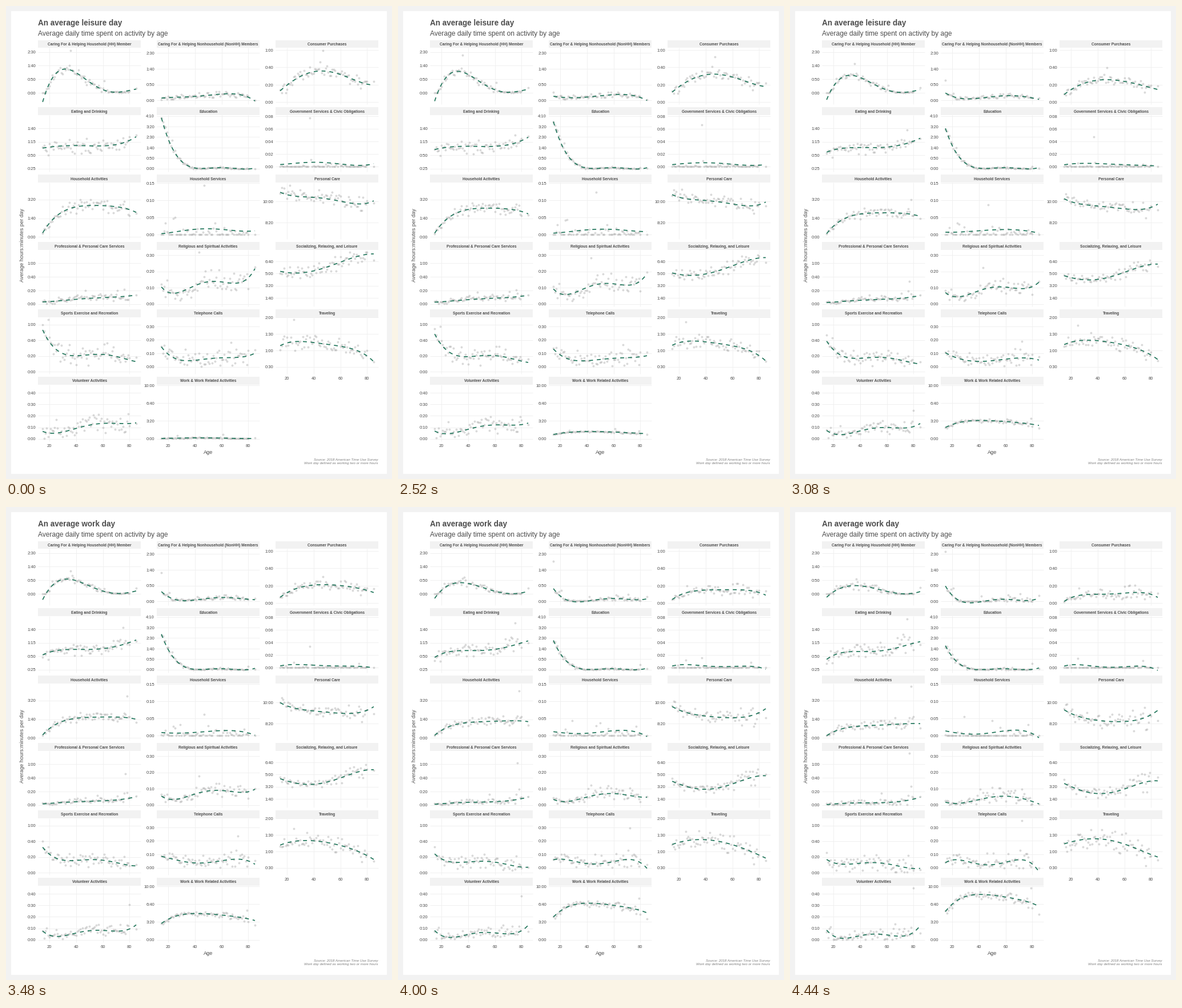
These frames come from a looping animation (676 by 828 pixels, 6720 ms). A matplotlib script:

```python
import numpy as np
import matplotlib.pyplot as plt
from matplotlib.animation import FuncAnimation
from matplotlib.collections import LineCollection
from matplotlib.patches import Rectangle

W, H = 676, 828
FRAMES, STEP_MS = 168, 40
HOLD, MOVE = 55, 56          # last still frame, length of the transition
INK, PALE, GREEN = "#4d4d4d", "#f2f2f2", "#20755a"

LEFT, COLUMN, PANEL_W = 56, 208, 180.2
TOP, ROW, STRIP_H, PANEL_H = 59.6, 117.85, 13.8, 99

plt.rcParams["font.family"] = "Liberation Sans"
fig = plt.figure(figsize=(W / 72, H / 72), dpi=72, facecolor=PALE)
ax = fig.add_axes([0, 0, 1, 1])
ax.set_xlim(0, W)
ax.set_ylim(H, 0)
ax.axis("off")
ax.add_patch(Rectangle((9, 9), W - 18, H - 18, fc="white", lw=0))

ages = np.append(np.arange(15, 81), 85)
knots = (15, 25, 50, 75, 85)
fine = np.linspace(15, 85, 90)

grid, dot_runs, lines = [], [], []


def label(x, y, s, size, ha="left", color=INK, **kw):
    return ax.text(x, y, s, fontsize=size, ha=ha, va="baseline", color=color, **kw)


def scatter(curve, zero, noise, growth, rest, rng):
    """Dots around a curve: spread follows the root of the value, few leap up."""
    n = len(ages)
    mid = curve(ages)
    older = np.clip((ages - 50) / 35, 0, 1)
    sd = noise * np.sqrt(np.maximum(mid - zero, 0.5)) * (1 + growth * older)
    off = sd * np.clip(rng.standard_normal(n), -2, 2)
    leap = (rng.random(n) < 0.05) * 15 * noise * rng.random(n)
    if rest:                 # most dots lie on the zero line
        mid, off = zero, np.abs(off) * (rng.random(n) < 0.35)
    return mid + off + leap


def panel(name, step, rise, dy, leisure, work, noise, peak, start=0, rest=False):
    """Heights are pixels above the first tick, which sits `rise` above the bottom."""
    i = len(lines)
    row, col = divmod(i, 3)
    left, top = LEFT + COLUMN * col, TOP + ROW * row
    right, y_top, y_low = left + PANEL_W, top + STRIP_H, top + STRIP_H + PANEL_H
    base = y_low - rise

    def age_x(age):
        return left + 8.2 + (age - 15) * 2.34

    ax.add_patch(Rectangle((left, top), PANEL_W, STRIP_H, fc=PALE, lw=0))
    label(left + PANEL_W / 2, top + 9.5, name, 6.6, "center", weight="bold")
    for n in range(int((base - y_top) / dy) + 1):
        y, minutes = base - n * dy, (start + n) * step
        grid.append([(left, y), (right, y)])
        label(left - 4, y + 2.7, f"{minutes // 60}:{minutes % 60:02d}", 7.6, "right")
    for age in range(20, 81, 20):
        x = age_x(age)
        grid.append([(x, y_top), (x, y_low)])
        if i >= 14:
            label(x, y_low + 10.5, str(age), 7.6, "center")

    rng = np.random.default_rng(40 + i)
    zero = -dy * start
    curves = [np.polynomial.Polynomial.fit(knots, k, 4) for k in (leisure, work)]
    clouds = [scatter(c, zero, noise, growth, rest, rng)
              for growth, c in enumerate(curves)]
    which, age = peak        # the highest dot sets the panel's scale
    clouds[which][ages == age] = PANEL_H
    clouds = [base - np.clip(c, max(zero, 4.5 - rise), PANEL_H - 4.5 - rise)
              for c in clouds]
    dot_runs.append((age_x(ages), *clouds))

    line, = ax.plot([], [], color=GREEN, lw=1.71, zorder=3)
    line.set_dashes((4, 4))
    line.set_dash_capstyle("butt")
    lines.append((line, age_x(fine), *(base - c(fine) for c in curves)))


panel("Caring For & Helping Household (HH) Member", 50, 20.4, 23.8,
      (-16, 34, 19, 2, 6.5), (-6, 9.5, 10, 0, 4), 0.9, (0, 36))
panel("Caring For & Helping Nonhousehold (NonHH) Members", 50, 7.1, 27.7,
      (4, 5.5, 9, 9.5, -1), (27, 2, 2.5, 1.5, 6), 1, (1, 15))
panel("Consumer Purchases", 20, 4.1, 30.45,
      (20, 38, 54, 35, 30), (3, 13, 16, 18, 10), 1.1, (0, 47))
panel("Eating and Drinking", 25, 5.5, 23.6,
      (36, 39, 40, 45, 56), (18, 29, 32, 43, 49), 0.85, (1, 75), start=1)
panel("Education", 50, 5.5, 18.45,
      (89, 28, 0.7, -0.5, 1.5), (42, 11, 1, 0, 3), 0.8, (0, 15))
panel("Government Services & Civic Obligations", 2, 9.2, 22,
      (3.5, 5.5, 6.7, 2, 5), (2.5, 5, 0.5, 2, -5), 1.2, (0, 37), rest=True)
panel("Household Activities", 100, 3.8, 32.8,
      (7, 36, 55, 51, 43), (4, 15, 22, 25, 25), 0.8, (1, 78))
panel("Household Services", 5, 8.1, 30,
      (1.5, 4.5, 10, 6, 6.5), (8, 4, 5, 7.5, -4), 2.2, (0, 47), rest=True)
panel("Personal Care", 100, 29.1, 37,
      (53, 46.5, 41.5, 32.5, 38), (24, 13, 3.5, 10, 23), 0.45, (0, 22), start=5)
panel("Professional & Personal Care Services", 20, 4.2, 23.8,
      (3.7, 5.2, 10, 13.2, 15.7), (0.7, 2.7, 4, 8, 13.7), 1.2, (1, 77))
panel("Religious and Spiritual Activities", 10, 4.2, 28.55,
      (30, 19, 39, 38.5, 62), (5, 3, 14, 10, 2), 1.6, (0, 43))
panel("Socializing, Relaxing, and Leisure", 100, 15, 21.3,
      (46.5, 43.5, 54, 74, 77), (27, 17, 11, 29, 31.5), 0.7, (0, 80), start=1)
panel("Sports Exercise and Recreation", 20, 3.8, 27.4,
      (73, 39, 29.5, 23.5, 17.5), (23, 15, 17.5, 8.5, 7.5), 1.7, (0, 19))
panel("Telephone Calls", 10, 12.1, 23.6,
      (35, 15, 14.2, 17.2, 24), (9, 14, 5.5, 13, -7), 1.7, (1, 72))
panel("Traveling", 30, 12.1, 28.75,
      (37, 44, 39.5, 26, 9), (42, 48, 48, 28, 19), 0.9, (0, 25), start=1)
panel("Volunteer Activities", 10, 4, 20.1,
      (13, 10, 24, 26.7, 28), (17, 3, 10, 7.7, 25), 1.6, (1, 80))
panel("Work & Work Related Activities", 200, 4.1, 31.2,
      (0.5, 1, 1.5, 0.5, 0.5), (49.5, 70.5, 78, 67.5, 58.5), 0.45, (1, 79))

ax.add_collection(LineCollection(grid, colors="#efefef", linewidths=0.9, zorder=1))
xs, start, end = (np.concatenate(part) for part in zip(*dot_runs))
dots = ax.scatter(xs, start, s=9.5, zorder=2, linewidths=0.75,
                  facecolors=(0.4, 0.4, 0.4, 0.18), edgecolors=(0.4, 0.4, 0.4, 0.22))

title = label(56, 34, "", 13.55, weight="bold")
label(56, 51.8, "Average daily time spent on activity by age", 12)
label(354, 784, "Age", 9.2, "center")
label(31, 418.5, "Average hours:minutes per day", 9.3, "center",
      rotation=90, rotation_mode="anchor")
for y, note in ((795.7, "Source: 2018 American Time Use Survey"),
                (802.4, "Work day defined as working two or more hours")):
    label(652, y, note, 6.15, "right", "#7f7f7f", style="italic")


def draw(k):
    p = min(max((k - HOLD) / MOVE, 0), 1)
    dots.set_offsets(np.column_stack([xs, start + (end - start) * p]))
    for line, x, a, b in lines:
        line.set_data(x, a + (b - a) * p)
    title.set_text(f"An average {'work' if p > 0.5 else 'leisure'} day")
    return [dots, title] + [item[0] for item in lines]


anim = FuncAnimation(fig, draw, frames=FRAMES, interval=STEP_MS,
                     repeat=True, repeat_delay=0, blit=False)
plt.show()
```
